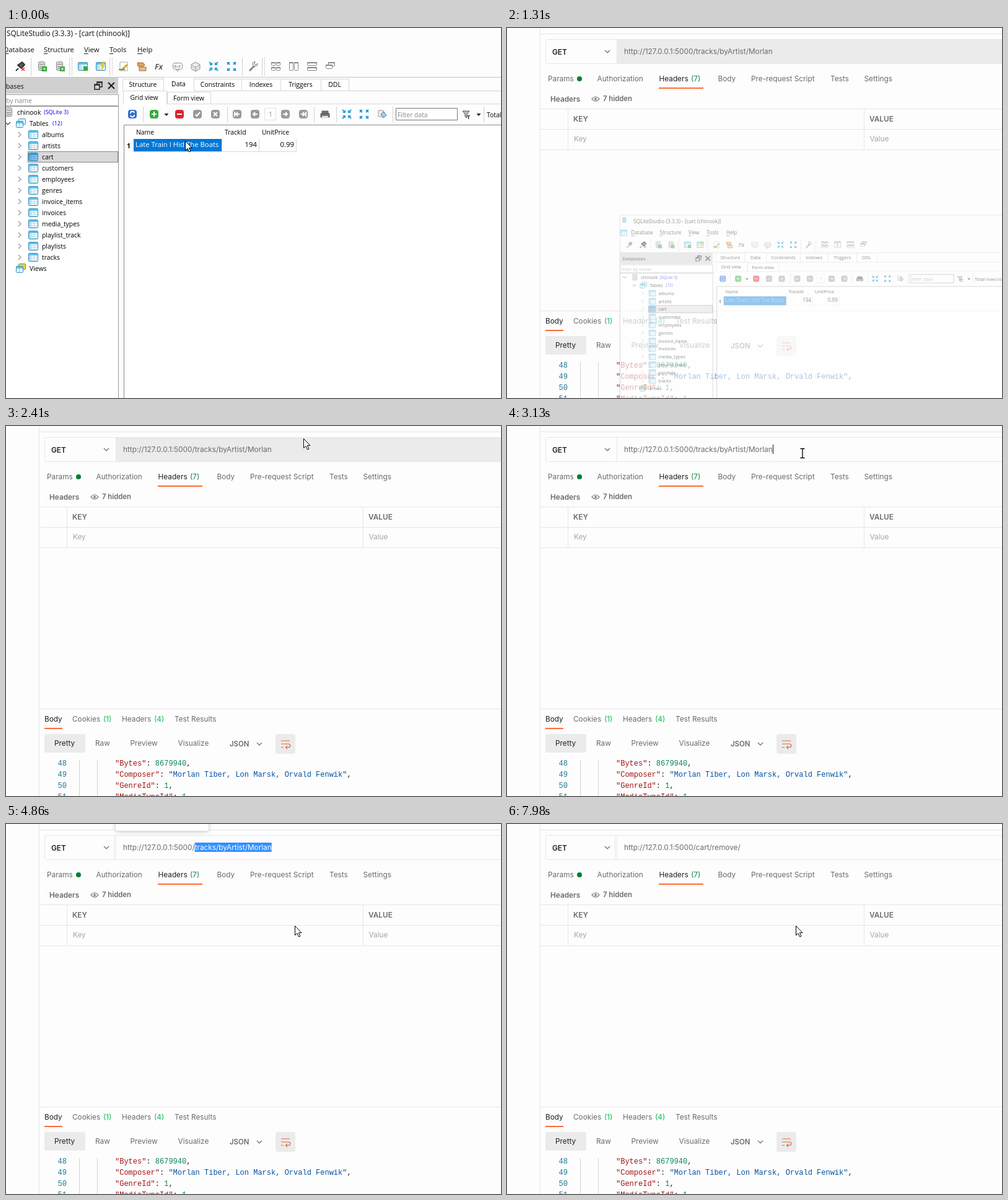
An HTML page with a canvas for the animation above (8000 ms loop, 799 px wide and 597 px high).

```html
<!DOCTYPE html>
<html lang="en">
<head>
<meta charset="utf-8">
<title>Removing from the cart</title>
<style>
html, body { margin: 0; width: 100%; height: 100%; overflow: hidden; background: #fdfdfd; }
canvas { display: block; }
</style>
</head>
<body>
<canvas id="stage" width="799" height="597"></canvas>
<script>
const ctx = document.getElementById('stage').getContext('2d');
const LOOP = 8000;
const UI = '11.8px Inter, sans-serif', UI_BOLD = '600 ' + UI;
const WIN = '11.35px "Open Sans", sans-serif', SMALL = '10.4px "Open Sans", sans-serif';
const TINY = '9px "Open Sans", sans-serif', MONO = '12px "Liberation Mono", monospace';
const GREY = '#6b6b6b', LINE = '#e6e6e6', ORANGE = '#ff6c37', BLUE = '#1f9ad6', GREEN = '#2fae3c';

// time, x, y of the pointer; no position means hidden
const pointer = [
  [0, 289, 182], [140, 340, 225], [260, 500, 300], [380, 792, 393], [530],
  [1590, 532, 44], [1760, 389, 64], [1910, 310, 110], [2030, 241, 143], [2160, 262, 130],
  [2290, 400, 70], [2410, 480, 20], [2560, 480, 24], [2710, 481, 35], [2860, 479, 38],
  [3010, 477, 44], [3280, 410, 41], [3400, 355, 41], [3550, 322, 41], [3670, 293, 41],
  [3820, 305, 41], [3940, 317, 41], [4190, 314, 42], [4470, 312, 43], [4720, 311, 43],
  [4860, 466, 164]
];
const base = 'http://127.0.0.1:5000/';
const typed = [
  [0, 'tracks/byArtist/Morlan'], [4980, 'c'], [5130, 'ca'], [5250, 'cart'], [6110, 'cart/'],
  [6480, 'cart/re'], [6600, 'cart/rem'], [7060, 'cart/remo'], [7180, 'cart/remove'], [7450, 'cart/remove/']
];
const latest = (list, t) => list.filter(step => step[0] <= t).pop();

function rect(x, y, w, h, color) {
  ctx.fillStyle = color;
  ctx.fillRect(x, y, w, h);
}
function round(x, y, w, h, r, fill, stroke) {
  ctx.beginPath();
  ctx.roundRect(x, y, w, h, r);
  if (fill) { ctx.fillStyle = fill; ctx.fill(); }
  if (stroke) { ctx.strokeStyle = stroke; ctx.lineWidth = 1; ctx.stroke(); }
}
function text(str, x, y, color = GREY, font = UI, align = 'left') {
  ctx.font = font;
  ctx.fillStyle = color;
  ctx.textAlign = align;
  ctx.fillText(str, x, y);
}
function path(d, x, y, stroke, fill, width = 1) {
  const shape = new Path2D(d);
  ctx.save();
  ctx.translate(x, y);
  if (fill) { ctx.fillStyle = fill; ctx.fill(shape); }
  if (stroke) { ctx.strokeStyle = stroke; ctx.lineWidth = width; ctx.stroke(shape); }
  ctx.restore();
}
const chevron = (x, y, color) => path('M-4-2L0 2L4-2', x, y, color, null, 1.2);
const dropArrow = (x, y) => path('M-3.5-2H3.5L0 2Z', x, y, null, '#222');

function arrow(x, y) {
  path('M.5.5V15.5L4 12.3L6.6 18L9 17L6.5 11.5H11Z', x, y, '#000', '#fff');
}
function ibeam(x, y) {
  path('M-3.5-7.5H-1L0-6.5L1-7.5H3.5M0-6.5V6.5M-3.5 7.5H-1L0 6.5L1 7.5H3.5', x, y, '#000', null, 1.3);
}

// ---- database window ----

function tableIcon(x, y) {
  round(x - 7.5, y - 6.5, 15, 13, 1, '#fff', '#3a8fb7');
  rect(x - 7, y - 6, 14, 3, '#5cc3ee');
  rect(x - 7, y - 3, 3, 9, '#a5dcf5');
  for (let i = 0; i < 3; i++) rect(x - 7, y - 1 + i * 3, 14, 1, '#b5d8e8');
  for (const dx of [-3, 1]) rect(x + dx, y - 3, 1, 9, '#b5d8e8');
}
function folderIcon(x, y, back) {
  round(x - 3.5, y - 7.5, 11, 9, 1, back, '#3a8fb7');
  round(x - 7.5, y - 3.5, 11, 10, 1, '#e5f6fd', '#3a8fb7');
  rect(x - 7, y - 3, 10, 3, '#5cc3ee');
  rect(x - 3, y, 1, 6, '#8fc9e3');
}
function databaseIcon(x, y, mark) {
  round(x - 5.5, y - 7.5, 10, 14, 2, '#d8d8d8', '#8b8b8b');
  for (const dy of [-4, 0, 3]) rect(x - 4, y + dy, 7, 1, '#888');
  if (mark) {
    rect(x, y, 8, 8, mark);
    path('M2 4H6M4 2V6', x, y, '#fff');
  }
}
function diagonalArrows(x, y, inward) {
  for (const [sx, sy] of [[1, 1], [-1, 1], [1, -1], [-1, -1]]) {
    ctx.save();
    ctx.translate(x, y);
    ctx.scale(sx, sy);
    path(inward ? 'M2 2H7L2 7Z' : 'M7 7H2L7 2Z', 0, 0, null, BLUE);
    path('M3 3L7 7', 0, 0, BLUE, null, 2);
    ctx.restore();
  }
}
function button(x, y, fill, sign, color = '#fff') {
  round(x - 6.5, y - 6.5, 13, 13, 3, fill, fill);
  path(sign, x, y, color, null, 2);
}
const separators = (xs, y, h) => xs.forEach(x => rect(x, y, 1, h, '#d2d2d2'));
function grip(x) {
  for (let y = 48; y < 77; y += 3) rect(x, y, 1, 1, '#999');
}

function menuAndToolbar() {
  round(-24, -1, 9, 13, 2, '#7fb8dc');
  text('SQLiteStudio (3.3.3) - [cart (chinook)]', 1, 13, '#111', '11.75px "Open Sans", sans-serif');
  tableIcon(-21, 35);
  [['Database', -4], ['Structure', 61], ['View', 126], ['Tools', 167], ['Help', 212]].forEach(([label, x]) => {
    text(label, x, 39, '#111', WIN);
    rect(x, 41, ctx.measureText(label[0]).width, 1, '#222');
  });

  const y = 62;
  separators([40, 102, 167, 381, 413], 48, 29);
  [106, 171, 417].forEach(grip);
  path('M-6 7L-1 2M-2-2L2 2L6-3L3-6Z', -8, y, '#777', '#999', 2);
  path('M-7 7L-3 3M-4-2L2 3L7-3L3-7Z', 23, y, '#333', '#555', 2);
  path('M2 2L7 7M7 2L2 7', 23, y, '#d33', null, 1.5);
  databaseIcon(58, y, GREEN);
  databaseIcon(87, y, '#49a84f');
  tableIcon(124, y);
  rect(125, 62, 7, 7, GREEN);
  tableIcon(153, y);
  path('M2-8L-2 0H2L-1 7L7-2H3L6-8Z', 154, y, null, '#e8c62b');
  path('M-6-7H6V7H-6Z', 190, y, '#aaa', '#fff');
  path('M-4 6L6-3', 190, y, '#d5a02c', null, 3);
  path('M-7 5H3', 189, y, '#5aa845', null, 2);
  path('M-7-6H2L5-3L3 0H-6Z', 219, y, '#a0713c', '#dca361');
  path('M-4 1H7V7H-4Z', 219, y, '#a0713c', '#e8bd85');
  text('Fx', 240, 67, '#444', 'italic 600 13px "Open Sans", sans-serif');
  round(269.5, 56.5, 15, 10, 3, '#fff', '#888');
  text('a-z', 271, 64, '#555', '8px "Open Sans", sans-serif');
  path('M-2 5L0 8L2 5', 277, y, '#888', '#fff');
  path('M-7-3L0-7L7-3V4L0 8L-7 4ZM-7-3L0 1L7-3M0 1V8', 306, y, '#999', '#e2e2e2');
  diagonalArrows(335, y, true);
  diagonalArrows(364, y, false);
  path('M-6 7L2-1', 399, y, '#888', null, 3);
  path('M7-5A4 4 0 1 1 3-8L2-4L4-2Z', 399, y, '#777', '#eee');
  const pane = (px, py, w, h) => {
    round(px + .5, py + .5, w, h, 1, '#fff', '#888');
    rect(px, py, w + 1, 2, '#888');
  };
  for (const dx of [0, 8]) for (const dy of [0, 8]) pane(428 + dx, 55 + dy, 6, 5);
  for (const dx of [0, 8]) pane(457 + dx, 55, 6, 13);
  for (const dy of [0, 8]) pane(486, 55 + dy, 15, 5);
  for (const d of [0, 4]) pane(520 - d, 55 + d, 10, 6);
  rect(-30, 79, 1000, 1, '#c4c4c4');
}

function databaseTree() {
  rect(-30, 80, 211, 26, '#d0d0d0');
  text('Databases', -24, 98, '#111', '10.8px "Open Sans", sans-serif');
  path('M-2-2V-6H6V2H2M-6-2H2V6H-6ZM-6-1H2M-2-5H6', 149, 93, '#222', null, 1.5);
  path('M-5-5L5 5M5-5L-5 5', 170, 93, '#222', null, 2.2);
  round(-29.5, 107.5, 211, 18, 0, '#fff', '#9a9a9a');
  text('Filter by name', -27, 121, '#888', SMALL);
  round(-29.5, 126.5, 211, 700, 0, '#fff', '#9a9a9a');

  chevron(-19, 136, '#333');
  databaseIcon(5, 136);
  text('chinook', 18, 140, '#000', SMALL);
  text('(SQLite 3)', 61, 139, '#00f', TINY);
  chevron(3, 154, '#333');
  folderIcon(24, 154, '#d9f0fb');
  text('Tables', 38, 158, '#000', SMALL);
  text('(12)', 75, 157, '#00f', TINY);

  const tables = ['albums', 'artists', 'cart', 'customers', 'employees', 'genres', 'invoice_items',
    'invoices', 'media_types', 'playlist_track', 'playlists', 'tracks'];
  tables.forEach((name, i) => {
    const y = 172 + i * 18;
    if (name === 'cart') {
      rect(35, y - 9, 146, 18, '#d9d9d9');
      ctx.setLineDash([1, 1]);
      round(35.5, y - 8.5, 145, 17, 0, null, '#333');
      ctx.setLineDash([]);
    }
    path('M-2-4L2 0L-2 4', 22, y, '#999', null, 1.3);
    tableIcon(44, y);
    if (name === 'cart') rect(37, y - 6, 14, 12, 'rgba(0,110,200,.45)');
    text(name, 58, y + 4, '#000', SMALL);
  });
  folderIcon(24, 388, '#f1cf45');
  text('Views', 38, 392, '#000', SMALL);
}

function dataPane() {
  rect(188, 101, 800, 1, '#d0d0d0');
  [['Structure', 188, 254], ['Data', 254, 303], ['Constraints', 303, 380], ['Indexes', 380, 443],
    ['Triggers', 443, 508], ['DDL', 508, 553]].forEach(([label, left, right]) => {
    const active = label === 'Data';
    round(left + .5, active ? 79.5 : 82.5, right - left, active ? 23 : 19, 0, '#fff', '#d8d8d8');
    if (active) rect(left + 1, 101, right - left - 1, 3, '#fff');
    text(label, (left + right) / 2, active ? 94 : 95, '#000', SMALL, 'center');
  });
  rect(188, 122, 800, 1, '#d8d8d8');
  round(260.5, 103.5, 70, 19, 0, '#fff', '#d8d8d8');
  round(189.5, 101.5, 70, 22, 0, '#fff', '#d8d8d8');
  rect(190, 122, 69, 3, '#fff');
  text('Grid view', 223, 116, '#000', SMALL, 'center');
  text('Form view', 295, 117, '#000', SMALL, 'center');

  const y = 139;
  separators([221, 357, 497, 533, 624, 771], 127, 25);
  button(204, y, '#2d6fd2', 'M-3-1A3 3 0 0 1 3-2M3 1A3 3 0 0 1-3 2');
  button(239, y, GREEN, 'M-4 0H4M0-4V4');
  dropArrow(259, 140);
  button(280, y, '#d9262c', 'M-4 0H4');
  button(309, y, '#999', 'M-3 0L-1 3L4-3');
  button(338, y, '#999', 'M-3-3L3 3M3-3L-3 3');
  button(373, y, '#999', 'M-4-4V4M4 0H-1M1-3L-2 0L1 3');
  button(402, y, '#999', 'M4 0H-3M0-3L-3 0L0 3');
  round(417.5, 129.5, 18, 19, 0, '#fff', '#e2e2e2');
  text('1', 427, 143, '#888', SMALL, 'center');
  button(451, y, '#999', 'M-4 0H3M0-3L3 0L0 3');
  button(480, y, '#999', 'M4-4V4M-4 0H1M-1-3L2 0L-1 3');
  path('M-5-5H5V-1H-5ZM-7-1H7V5H-7Z', 515, y, '#555', '#777');
  rect(510, 142, 10, 4, '#d7e8ef');
  diagonalArrows(550, y, true);
  diagonalArrows(578, y, false);
  path('M-6-6H2V4H-6Z', 607, y, '#999', '#eee');
  path('M-2 0L3-4L7 2L2 6Z', 607, y, '#55789a', '#a9cbe2');
  round(629.5, 129.5, 99, 19, 0, '#fff', '#777');
  text('Filter data', 632, 144, '#888', SMALL);
  path('M-6-5H5L1 0V6L-2 4V0Z', 743, y, '#555', '#bbb');
  text('T', 744, 147, '#333', 'bold ' + TINY);
  dropArrow(763, 140);
  text('Total rows loaded: 1', 776, 144, '#000', SMALL);

  round(190.5, 156.5, 800, 700, 0, '#fff', '#8a8a8a');
  text('Name', 210, 172, '#000', SMALL);
  text('TrackId', 353, 172, '#000', SMALL);
  text('UnitPrice', 413, 172, '#000', SMALL);
  text('1', 195, 194, '#000', 'bold ' + SMALL);
  rect(206, 199, 263, 1, '#d8d8d8');
  for (const x of [348, 408, 468]) rect(x, 179, 1, 20, '#d8d8d8');
  rect(206, 179, 142, 20, '#0078d7');
  text('Late Train I Hid The Boats', 209, 192, '#fff', WIN);
  text('194', 405, 192, '#000', WIN, 'right');
  text('0.99', 465, 192, '#000', WIN, 'right');
}

function databaseWindow() {
  rect(-30, -6, 1000, 800, '#fdfdfd');
  rect(-30, -6, 1000, 1, '#bbb');
  rect(-30, -6, 1, 800, '#bbb');
  menuAndToolbar();
  databaseTree();
  dataPane();
}

// ---- request window ----

function urlField(t) {
  const hovered = t < 1440 || (t >= 1590 && t < 3010);
  round(62.5, 18.5, 760, 39, 3, '#fdfdfd', LINE);
  if (hovered) rect(178, 19, 621, 38, '#ebebeb');
  rect(177, 19, 1, 38, LINE);
  if (t >= 4860) rect(174, 19, 1, 38, LINE);
  text('GET', 73, 43, '#212121', UI_BOLD);
  chevron(162, 38, '#6b6b6b');

  const [since, tail] = latest(typed, t);
  const url = base + tail;
  text(url, 189, 42);
  const end = 189 + ctx.measureText(url).width;

  if (t >= 3280 && t < 4980) {
    const dragX = t >= 4470 ? 311 : latest(pointer, t)[1];
    let start = 0;
    if (t >= 4470) start = base.length;
    else while (189 + ctx.measureText(url.slice(0, start + 1)).width < dragX) start++;
    const left = 189 + ctx.measureText(url.slice(0, start)).width;
    rect(left, 30, end - left, 15, '#3390ff');
    text(url.slice(start), left, 42, '#fff');
  } else if (t >= 3010 && (t < 3280 || (t - since) % 1060 < 530)) {
    rect(Math.round(end), 30, 1, 15, '#111');
  }
}

function codeLine(number, key, value, valueColor, y) {
  const x = 176, step = 7.2, name = `"${key}"`;
  text(number, 98, y, '#237893', MONO, 'right');
  text(name, x, y, '#a31515', MONO);
  text(':', x + name.length * step, y, '#222', MONO);
  const valueX = x + (name.length + 2) * step;
  text(value, valueX, y, valueColor, MONO);
  text(',', valueX + value.length * step, y, '#222', MONO);
}

function requestWindow(t) {
  rect(0, 0, 799, 597, '#fdfdfd');
  rect(53, 0, 1, 597, LINE);
  rect(54, 9, 745, 1, LINE);
  urlField(t);

  [['Params', 66], ['Authorization', 145.5], ['Body', 340.5], ['Pre-request Script', 394],
    ['Tests', 522], ['Settings', 576.5]].forEach(([label, x]) => text(label, x, 86));
  round(113, 78, 8, 8, 4, '#007f31');
  text('Headers', 245.5, 86, '#212121');
  text('(7)', 297, 86, '#158048');
  rect(245, 96, 72, 2, ORANGE);
  text('Headers', 70, 119, GREY, UI_BOLD);
  path('M-6 0Q0-7 6 0Q0 7-6 0Z', 143, 114.5, '#888', null, 1.2);
  round(141, 112.5, 4, 4, 2, '#888');
  text('7 hidden', 155, 118, GREY, '600 11.3px Inter, sans-serif');

  for (const y of [130, 163, 196]) rect(54, y, 745, 1, LINE);
  for (const x of [98, 576]) rect(x, 130, 1, 67, LINE);
  text('KEY', 107, 151, GREY, UI_BOLD);
  text('VALUE', 585, 151, GREY, UI_BOLD);
  text('Key', 108, 183, '#a6a6a6');
  text('Value', 585.5, 183, '#a6a6a6');

  rect(54, 456, 745, 1, LINE);
  text('Body', 62, 477, '#212121');
  rect(62, 487, 29, 2, ORANGE);
  text('Cookies', 107, 477);
  text('(1)', 157, 477, '#0cbb52');
  text('Headers', 187, 477);
  text('(4)', 239, 477, '#0cbb52');
  text('Test Results', 272, 477);

  round(62, 497, 66, 30, 3, '#ebebeb');
  text('Pretty', 78, 516, '#212121');
  text('Raw', 144, 516);
  text('Preview', 200.5, 516);
  text('Visualize', 277.5, 516);
  text('JSON', 361, 517, GREY, '600 11.4px Inter, sans-serif');
  chevron(409, 513, GREY);
  round(435, 497, 32, 32, 4, '#ebebeb');
  path('M-7-5H7M-7 0H5A2.7 2.7 0 0 1 5 5.5H1M3 3L.5 5.5L3 8M-7 5.5H-3', 451, 513, '#e8663c', null, 1.2);

  rect(118, 539, 1, 58, '#d3d3d3');
  rect(147, 539, 1, 58, '#d3d3d3');
  codeLine('48', 'Bytes', '8679940', '#098658', 548);
  codeLine('49', 'Composer', '"Morlan Tiber, Lon Marsk, Orvald Fenwik"', '#0451a5', 566);
  codeLine('50', 'GenreId', '1', '#098658', 584);
  codeLine('51', 'MediaTypeId', '1', '#098658', 602);
}

function tooltip() {
  ctx.save();
  ctx.shadowColor = 'rgba(0,0,0,.25)';
  ctx.shadowBlur = 6;
  ctx.shadowOffsetY = 1;
  round(177, -20, 150, 31, 4, '#fff');
  ctx.restore();
}

function draw(t) {
  if (t < 1310) {
    databaseWindow();
  } else {
    requestWindow(t);
    if (t < 1440) {
      ctx.save();
      ctx.globalAlpha = .42;
      ctx.translate(203.2, 305.7);
      ctx.scale(.711, .711);
      databaseWindow();
      ctx.restore();
    }
    if (t >= 4860 && t < 4980) tooltip();
  }
  const [, x, y] = latest(pointer, t);
  if (x === undefined) return;
  if (t >= 2710 && t < 4860) ibeam(x, y);
  else arrow(x, y);
}

function tick() {
  draw(performance.now() % LOOP);
  requestAnimationFrame(tick);
}
tick();
</script>
</body>
</html>
```
